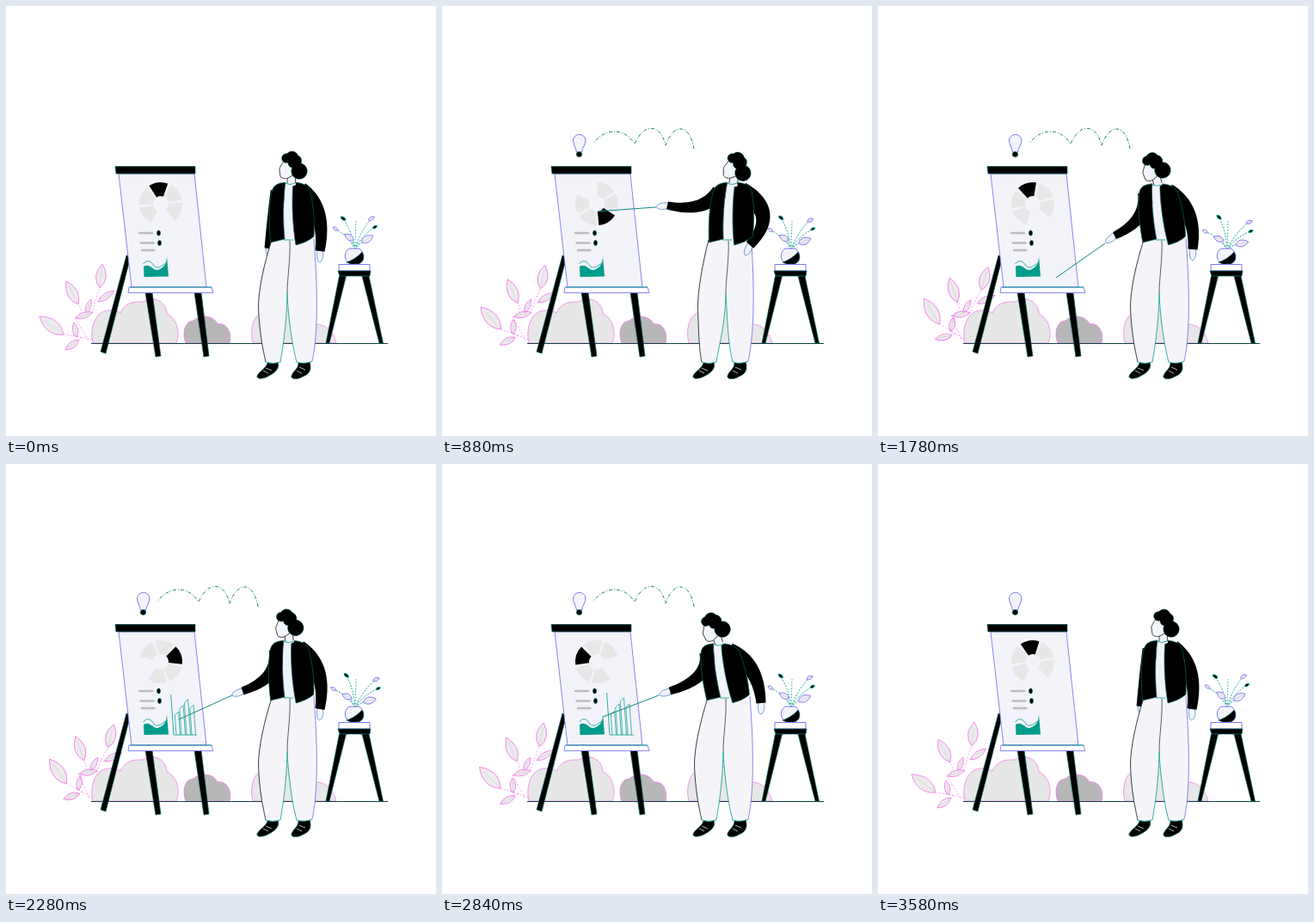
Animation of 500x500 px, one loop 3.6 s. Source, as an HTML page with a canvas:

```html
<!DOCTYPE html>
<html lang="en">
<head>
<meta charset="utf-8">
<title>Presentation</title>
<style>
html, body { margin: 0; width: 100%; height: 100%; overflow: hidden; background: #fff; }
canvas { display: block; width: 500px; height: 500px; }
</style>
</head>
<body>
<canvas id="stage" width="500" height="500"></canvas>
<script>
const g = document.getElementById('stage').getContext('2d');
const LOOP = 3600, RAD = Math.PI / 180;
const BLACK = '#000', TEAL = '#009c8c', DEEP = '#06655c', BLUE = '#7f77f2', PINK = '#f57cee';
const PAPER = '#f3f3fa', PALE = '#e7e7e7', WHITE = '#fff';

const clamp = v => Math.max(0, Math.min(1, v));
const ease = v => (1 - Math.cos(Math.PI * clamp(v))) / 2;
const mix = (a, b, k) => a + (b - a) * k;
const ramp = (t, a, b) => ease((t - a) / (b - a));

function shape(d, fill, stroke, width = 0.8) {
  const p = new Path2D(d);
  if (fill) { g.fillStyle = fill; g.fill(p); }
  if (stroke) { g.strokeStyle = stroke; g.lineWidth = width; g.stroke(p); }
}
const line = (d, color, width) => shape(d, null, color, width);
const solid = d => shape(d, BLACK, DEEP, 0.7);

function dashed(d, color, dash, width = 0.7) {
  g.setLineDash(dash);
  line(d, color, width);
  g.setLineDash([]);
}

function oval(x, y, rx, ry = rx, fill = BLACK, stroke) {
  g.beginPath();
  g.ellipse(x, y, rx, ry, 0, 0, 7);
  g.fillStyle = fill;
  g.fill();
  if (stroke) { g.strokeStyle = stroke; g.lineWidth = 0.7; g.stroke(); }
}

function turned(x, y, deg, draw) {
  g.save();
  g.translate(x, y);
  g.rotate(deg * RAD);
  g.translate(-x, -y);
  draw();
  g.restore();
}

// Pointed leaf from base a to tip b
function leaf(ax, ay, bx, by, w, fill = '#ececec', stroke = PINK) {
  const nx = (ay - by) * w, ny = (bx - ax) * w;
  const cx = mix(ax, bx, 0.45), cy = mix(ay, by, 0.45);
  shape(`M${ax} ${ay}Q${cx + nx} ${cy + ny} ${bx} ${by}Q${cx - nx} ${cy - ny} ${ax} ${ay}Z`, fill, stroke, 0.9);
  if (fill !== BLACK) line(`M${ax} ${ay}L${mix(ax, bx, 0.8)} ${mix(ay, by, 0.8)}`, '#c9bfd0', 0.5);
}

// Interpolated lookup in [time, ...values] rows
function at(rows, t, curve) {
  let i = 0;
  while (i < rows.length - 2 && t >= rows[i + 1][0]) i++;
  const a = rows[i], b = rows[i + 1], k = curve(clamp((t - a[0]) / (b[0] - a[0])));
  return a.slice(1).map((v, j) => mix(v, b[j + 1], k));
}

// time, lean, head turn, pointing arm: elbow, wrist, pointer grip, tip; other arm: elbow, wrist
const rest = [0, 0, 311, 246, 305, 282, 308, 291, 308, 291, 363, 243, 365, 285];
const poses = [
  [0, ...rest],
  [480, 7, 9, 298, 233, 262, 233, 249, 235, 182, 241, 373, 243, 358, 278],
  [1240, 6.5, 9, 298, 232, 262, 231, 249, 233, 181, 237, 373, 243, 358, 278],
  [1780, -6, -14, 303, 246, 275, 267, 264, 276, 207, 316, 361, 243, 366, 283],
  [2280, -2, -8, 306, 245, 275, 264, 263, 269, 201, 297, 363, 243, 365, 285],
  [2840, -9, -20, 299, 246, 265, 264, 252, 269, 187, 294, 360, 240, 371, 278],
  [3540, ...rest],
  [3600, ...rest]
];
const spin = [[0, 0], [540, 78], [1240, 237], [1780, 350], [2280, 437], [2840, 655], [3600, 720]];

function bushes() {
  shape('M101 392C97 374 104 355 119 354Q128 353 133 357C139 343 152 344 159 344C170 336 187 343 187 358C199 363 203 380 198 392Z', PALE, PINK);
  shape('M209 392C204 378 209 366 218 366C226 358 242 360 246 370C257 368 263 380 260 392Z', '#b7b7b7', PINK);
  shape('M287 392C283 375 288 358 300 356C315 349 348 350 355 370C370 368 380 377 384 392Z', PALE, PINK);
  line('M99 392.5H444', '#0b4640', 1);
}

function foliage(s) {
  turned(100, 388, 22 * s, () => {
    dashed('M100 388Q84 384 67 382M88 386L78 383', PINK, [2, 2]);
    leaf(67, 382, 39, 361, 0.4);
    leaf(82, 385, 79, 368, 0.38);
    leaf(85, 388, 69, 400, 0.36);
  });
  turned(100, 393, 10 * s, () => {
    dashed('M80 363Q92 354 84 348M100 358Q104 340 109 328M80 363L97 390', PINK, [2, 2]);
    leaf(84, 347, 70, 320, 0.4);
    leaf(109, 328, 112, 300, 0.42);
    leaf(81, 363, 101, 356, 0.32);
    leaf(93, 357, 99, 341, 0.35);
    leaf(107, 344, 126, 331, 0.3);
  });
}

function stool(s) {
  const stems = [
    [383, 259, -7, 7, PAPER], [392, 247, 7, 7, BLACK], [425, 247, 11, 8, '#efe9f8'],
    [429, 257, 11, 6, BLACK], [399, 269, -12, 13, '#ececf4'], [420, 271, 18, 16, '#ececf4']
  ];
  dashed('M406 283L407 250', TEAL, [2, 1.5]);
  for (const [x, y, turn, size, fill] of stems) turned(406, 283, turn * s, () => {
    dashed(`M406 283Q${mix(406, x, 0.3)} ${mix(283, y, 0.6)} ${x} ${y}`, TEAL, [2, 1.5], 0.9);
    const a = (x < 406 ? -145 : -30) * RAD, dx = Math.cos(a) * size / 2, dy = Math.sin(a) * size / 2;
    leaf(x - dx, y - dy, x + dx, y + dy, 0.5, fill, fill === BLACK ? TEAL : BLUE);
  });
  shape('M399 282H411C418 288 417 299 409 300H401C393 297 392 287 399 282Z', PAPER, BLUE, 1);
  solid('M396 298C402 296 410 291 414 286C418 292 415 299 409 300H401Z');
  shape('M387 300.5H423V308H387Z', WHITE, BLUE, 1);
  solid('M386 308H424L423 314H388Z');
  solid('M387.500 314H395.500L376 392H372Z');
  solid('M414 314H422L438.500 392H434Z');
}

function pie(deg) {
  for (let i = 0; i < 6; i++) {
    if (i === 3) continue;
    const mid = (-97 + deg + i * 60) * RAD, half = 26 * RAD;
    g.beginPath();
    g.arc(180, 230, 25, mid - half, mid + half);
    g.arc(180, 230, 9, mid + half, mid - half, true);
    g.closePath();
    g.fillStyle = i ? PALE : BLACK;
    g.fill();
  }
}

function bars(t) {
  const show = ramp(t, 1800, 2350) * (1 - ramp(t, 2950, 3400));
  if (show < 0.01) return;
  const px = (x, y) => `${x - (315 - y) * 0.07} ${y}`;
  line(`M${px(195, 315 - 49 * show)}L195 315H${195 + 28 * show}`, TEAL, 0.8);
  [28, 36, 43, 36].forEach((h, i) => {
    const x = 198 + i * 6, top = 315 - h * show;
    line(`M${x} 315L${px(x, top + 4 * show)}L${px(x + 4.5, top)}L${x + 4.5} 315`, TEAL, 0.7);
  });
}

function board(t) {
  solid('M140 290L145 291L116 404L110 402Z');
  solid('M162 333H170L180 407L174 408Z');
  solid('M219 333H227L236 407L230 408Z');
  shape('M131 195H219L233 327H146Z', PAPER, BLUE, 0.9);
  solid('M127 186.5H220V195H128Z');
  shape('M143 327H239L241 333.5H142Z', WHITE, BLUE, 0.9);
  line('M144 327H239', TEAL, 0.9);
  pie(at(spin, t, k => k)[0]);
  g.lineCap = 'round';
  line('M155 264H170M156.500 275.500H171.500M158 284H172.500', '#bdbdbd', 2.4);
  g.lineCap = 'butt';
  oval(177.500, 264, 2, 3, BLACK, DEEP);
  oval(178.500, 275.500, 2, 3, BLACK, DEEP);
  shape('M160 303C164 300 168 303 171 305C175 309 179 306 182 304Q187 300 187 291L189 314.500L160.500 315Z', TEAL);
  line('M159.500 300C164 294 169 297 172 302C176 307 181 302 186 299', TEAL, 0.8);
  bars(t);
}

function idea(t) {
  const size = ramp(t, 0, 380);
  if (size > 0.01) {
    g.save();
    g.translate(159.500, 175);
    g.scale(size, size);
    g.translate(-159.500, -175);
    shape('M156.500 170C156 165 152.500 161 152.500 156A7.300 7.500 0 0 1 167 156C167 161 163 165 162.500 170Z', PAPER, BLUE, 1);
    oval(159.500, 172.500, 3.2, 3, BLACK, DEEP);
    g.restore();
  }
  const reach = ramp(t, 120, 600) * (1 - ramp(t, 2900, 3350));
  g.save();
  g.beginPath();
  g.rect(294 - 118 * reach, 130, 118 * reach, 50);
  g.clip();
  dashed('M293 166C288 136 269 136 260 162C254 136 234 136 224 160.500C213 141.500 190 141.500 177 158.500', '#04776c', [4, 2, 1, 2], 0.9);
  g.restore();
}

// Tapered sleeve bending through the elbow
function sleeve(sx, sy, ex, ey, wx, wy, from, to) {
  const cx = 2 * ex - (sx + wx) / 2, cy = 2 * ey - (sy + wy) / 2, left = [], right = [];
  for (let i = 0; i <= 20; i++) {
    const k = i / 20, q = 1 - k;
    const x = q * q * sx + 2 * q * k * cx + k * k * wx, y = q * q * sy + 2 * q * k * cy + k * k * wy;
    const a = Math.atan2(q * (cy - sy) + k * (wy - cy), q * (cx - sx) + k * (wx - cx));
    const r = mix(from, to, k) / 2, nx = -Math.sin(a) * r, ny = Math.cos(a) * r;
    left.push(`${x + nx} ${y + ny}`);
    right.unshift(`${x - nx} ${y - ny}`);
  }
  shape('M' + left.concat(right).join('L') + 'Z', BLACK);
}

function hand(x, y, tx, ty) {
  turned(x, y, Math.atan2(ty - y, tx - x) / RAD, () =>
    shape(`M${x - 1} ${y - 3}C${x + 6} ${y - 5} ${x + 11} ${y - 3} ${x + 13} ${y}C${x + 12} ${y + 4} ${x + 5} ${y + 4} ${x - 1} ${y + 3}Z`, PAPER, '#5a93c8'));
}

function head() {
  shape('M326 195H337V208Q331 211 326 207Z', PAPER);
  line('M327 200V206M336.500 198V206', '#222', 0.8);
  shape('M324 178C321 184 317 189 318 191L319 198C321 201 325 201 328 200L335 196L338 184Z', PAPER, '#222');
  const curls = [[326, 177, 5.3], [332.500, 176.500, 7.5], [337, 180, 6.6], [333, 183, 4.8], [341, 192, 9.2]];
  for (const [x, y, r] of curls) oval(x, y, r, r, BLACK, DEEP);
  for (const [x, y, r] of curls) oval(x, y, r - 0.3);
}

function shoes() {
  solid('M304 415L316 414C319 422 312 427 304 431C298 434 291 434 292 430C295 424 302 422 304 415Z');
  solid('M340 415L353 413C355 421 355 427 345 431C338 435 331 434 332 430C334 424 340 422 340 415Z');
  line('M302 421L309 424M299 424L305 427M341 420L348 423M338 424L344 427', WHITE, 0.7);
}

// Hips follow when the body leans back
function trousers(hip) {
  const knee = 293.5 + hip * 1.3, fork = 327 + hip;
  const outer = `C${300 + hip} 300 ${knee} 330 ${knee} 350C${knee + 1} 380 299 400 302 414`;
  const inner = `Q310 417 319 414C323 390 ${fork - 1} 370 ${fork} 335C${fork + 2} 370 333 395 338 414Q347 417 356 413`;
  const right = `C361 390 ${364 + hip * 0.3} 350 ${358 + hip * 0.5} 270`;
  const waist = `M${309 + hip * 0.3} 272`;
  shape(waist + outer + inner + right + 'Z', '#f5f5f9');
  line(waist + outer, '#26263a', 0.9);
  line('M356 413' + right, BLUE, 0.9);
  line('M302 414' + inner, TEAL, 0.8);
  line(`M${330 + hip} 272C${331 + hip} 295 ${fork} 315 ${fork} 335`, '#2c3b45', 0.8);
}

function person(t) {
  const [lean, nod, ex, ey, wx, wy, hx, hy, px, py, rex, rey, rwx, rwy] = at(poses, t, ease);
  const hip = Math.max(0, lean) * 0.45, drop = Math.min(0, lean) ** 2 * 0.045;

  if (Math.hypot(px - hx, py - hy) > 1) line(`M${hx} ${hy}L${px} ${py}`, '#0a8a80', 1);
  hand(wx, wy, hx, hy);
  sleeve(317 + lean * 0.9, 216 + drop, ex, ey, wx, wy, 19, 9);

  shoes();
  trousers(hip);
  hand(rwx, rwy, rwx < 362 ? rwx - 6 : rwx, rwy + 14);
  sleeve(342 + lean * 0.9, 216 + drop, rex, rey, rwx, rwy, 23, 11);

  g.save();
  g.translate(hip, 272);
  g.transform(1, 0, (hip - lean) / 65, 1 - drop / 65, 0, 0);
  g.translate(0, -272);
  shape('M324 205H337V273H322Z', PAPER);
  solid('M325 205C316 206 311 208 309 216C305 235 306 255 307.500 275L324 271C322 250 322 225 325 205Z');
  solid('M336 205C345 206 351 208 354 216C358 235 359 250 358 268C352 273 345 276 337 278C333 255 332 225 334 206Z');
  line('M323 272H334', TEAL, 0.8);
  g.restore();

  g.save();
  g.translate(lean, drop);
  turned(328, 207, nod, head);
  line('M324 206Q330 209 336.500 206', TEAL, 0.8);
  g.restore();
}

function frame(now) {
  const t = now % LOOP, sway = (1 - Math.cos(2 * Math.PI * t / LOOP)) / 2;
  g.fillStyle = WHITE;
  g.fillRect(0, 0, 500, 500);
  bushes();
  foliage(sway);
  stool(sway);
  board(t);
  idea(t);
  person(t);
  requestAnimationFrame(() => frame(performance.now() - start));
}
const start = performance.now();
frame(0);
</script>
</body>
</html>
```
